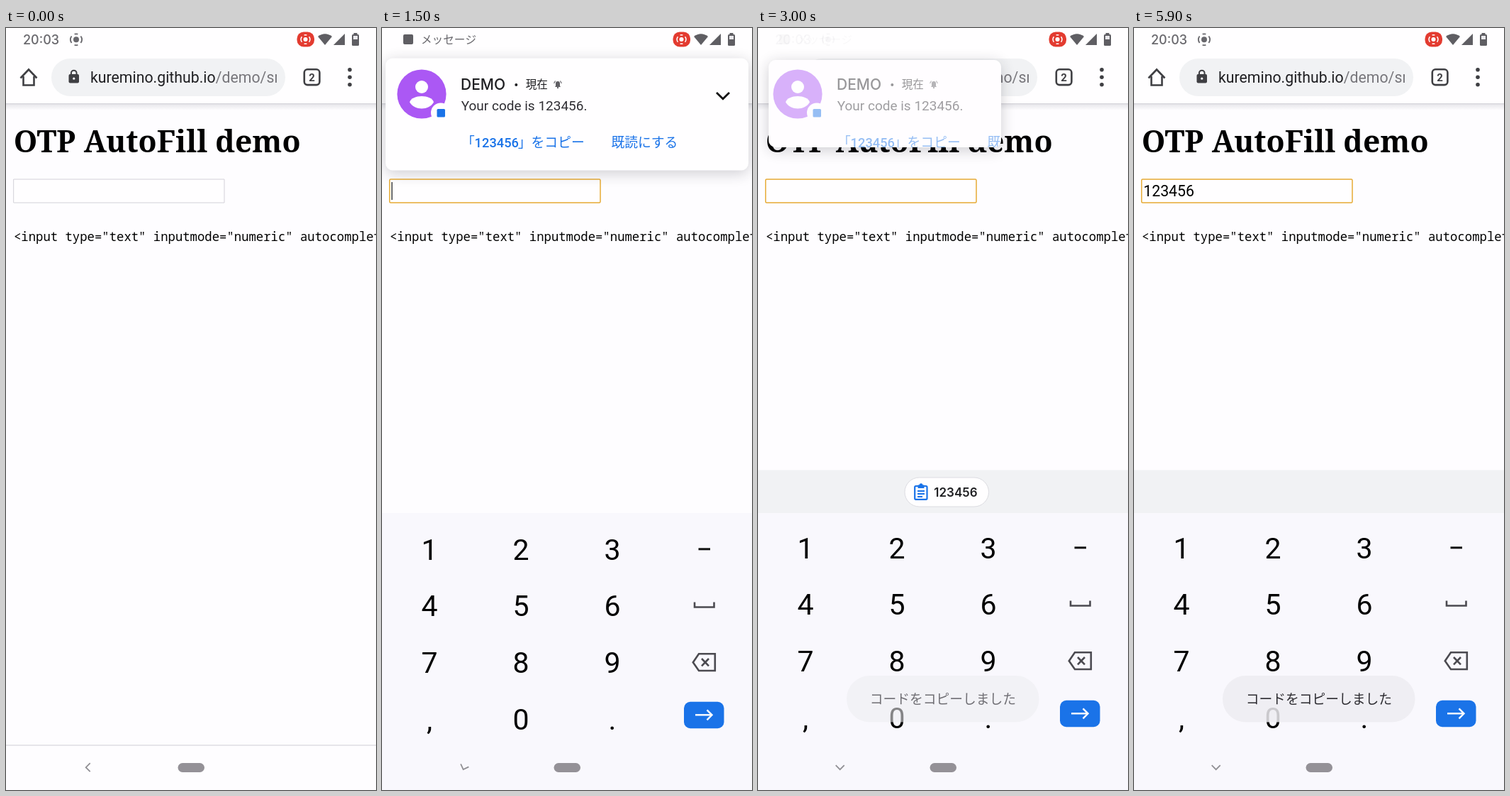
An HTML page with a canvas for the animation above (6 s loop, 522x1073 px).

```html
<!DOCTYPE html>
<html lang="ja">
<head>
<meta charset="utf-8">
<title>OTP AutoFill demo</title>
<style>
html, body { margin: 0; width: 100%; height: 100%; overflow: hidden; background: #fefdff; }
canvas { display: block; width: 522px; height: 1073px; }
</style>
</head>
<body>
<canvas id="stage" width="522" height="1073"></canvas>
<script>
const ctx = document.getElementById('stage').getContext('2d');
const W = 522, H = 1073, LOOP = 6000, STEP = 100;
const PAGE = '#fefdff', CARD = '#fffeff', INK = '#1f1f22', DARK = '#3f3f43';
const GRAY = '#5f5e63', BLUE = '#1a73e8', PILL = '#f1f2f4';
const ROBOTO = 'Roboto, sans-serif';
const INTER = 'Inter, sans-serif';
const CJK = '"Noto Sans CJK JP", "Noto Sans CJK", sans-serif';

// Linear interpolation through [time, value] pairs.
function key(t, ...pts) {
  if (t <= pts[0][0]) return pts[0][1];
  for (let i = 1; i < pts.length; i++) {
    const [t1, v1] = pts[i], [t0, v0] = pts[i - 1];
    if (t < t1) return v0 + (v1 - v0) * (t - t0) / (t1 - t0);
  }
  return pts[pts.length - 1][1];
}

function text(str, x, y, font, color, align = 'left') {
  ctx.font = font;
  ctx.fillStyle = color;
  ctx.textAlign = align;
  ctx.fillText(str, x, y);
}

function rect(x, y, w, h, color) {
  ctx.fillStyle = color;
  ctx.fillRect(x, y, w, h);
}

function roundPath(x, y, w, h, r) {
  ctx.beginPath();
  ctx.roundRect(x, y, w, h, r);
}

function round(x, y, w, h, r, color) {
  roundPath(x, y, w, h, r);
  ctx.fillStyle = color;
  ctx.fill();
}

function disc(x, y, r, color) {
  ctx.beginPath();
  ctx.arc(x, y, r, 0, Math.PI * 2);
  ctx.fillStyle = color;
  ctx.fill();
}

function stroke(color, width) {
  ctx.strokeStyle = color;
  ctx.lineWidth = width;
  ctx.stroke();
}

function poly(points, close) {
  ctx.beginPath();
  points.forEach(([x, y]) => ctx.lineTo(x, y));
  if (close) ctx.closePath();
}

function line(points, color, width, close) {
  poly(points, close);
  stroke(color, width);
}

function fill(points, color) {
  poly(points, true);
  ctx.fillStyle = color;
  ctx.fill();
}

function group(alpha, draw) {
  if (alpha <= 0) return;
  ctx.save();
  ctx.globalAlpha *= alpha;
  draw();
  ctx.restore();
}

function recordIcon(x, y, dot, ring, color, width) {
  disc(x, y, dot, color);
  for (let i = 0; i < 4; i++) {
    const mid = i * Math.PI / 2, half = i % 2 ? 0.3 : 0.64;
    ctx.beginPath();
    ctx.arc(x, y, ring, mid - half, mid + half);
    stroke(color, width);
  }
}

function statusBar(t) {
  const message = t < 2000
    ? key(t, [900, 0], [1000, 0.4], [1100, 1])
    : key(t, [2800, 1], [2900, 0.5], [3000, 0.04], [3100, 0]);
  const clock = t < 2000
    ? key(t, [900, 1], [1000, 0.3], [1100, 0])
    : key(t, [2900, 0], [3000, 0.05], [3100, 0.5], [3200, 0.9], [3300, 1]);
  group(clock, () => {
    text('20:03', 24, 23, '500 18px ' + INTER, '#68676c');
    recordIcon(99, 16.3, 4, 8, '#68676c', 1.8);
  });
  group(message, () => {
    round(30, 9, 14, 14, 2, GRAY);
    text('メッセージ', 55, 22, '15.6px ' + CJK, '#68676c');
  });

  round(410.5, 5.5, 24.5, 21, 9.5, '#e33b30');
  recordIcon(422.5, 16, 3, 6.3, '#fff', 1.5);
  ctx.beginPath();
  ctx.moveTo(450, 24);
  ctx.lineTo(440, 12);
  ctx.quadraticCurveTo(450, 4.5, 460, 12);
  ctx.closePath();
  ctx.fillStyle = GRAY;
  ctx.fill();
  fill([[478, 8], [478, 24], [462, 24]], GRAY);
  round(488, 9, 10, 16, 1.5, GRAY);
  rect(490.5, 7, 5, 3, GRAY);
  rect(490, 11, 6, 5, '#e9e8ec');
}

function toolbar() {
  rect(0, 0, W, 106, CARD);
  const shade = ctx.createLinearGradient(0, 106, 0, 116);
  shade.addColorStop(0, 'rgba(40,40,60,.20)');
  shade.addColorStop(0.25, 'rgba(40,40,60,.09)');
  shade.addColorStop(1, 'rgba(40,40,60,0)');
  rect(0, 106, W, 10, shade);

  line([[20.5, 70.5], [32, 58.5], [43.5, 70.5]], DARK, 2.6);
  line([[24.5, 68], [24.5, 80.5], [39.5, 80.5], [39.5, 68]], DARK, 2.6);

  round(64, 43, 330, 53, 26.5, PILL);
  round(88.5, 65, 14.5, 12.5, 2, DARK);
  ctx.beginPath();
  ctx.arc(95.75, 63.5, 3.8, Math.PI, 0);
  ctx.lineTo(99.55, 66);
  ctx.moveTo(91.95, 63.5);
  ctx.lineTo(91.95, 66);
  stroke(DARK, 2);
  disc(95.75, 71.2, 1.6, PILL);

  ctx.save();
  ctx.beginPath();
  ctx.rect(110, 43, 272, 53);
  ctx.clip();
  const host = 'kuremino.github.io', font = '21.3px ' + ROBOTO;
  text(host, 119, 77, font, INK);
  text('/demo/sms', 119 + ctx.measureText(host).width, 77, font, '#77767b');
  ctx.restore();

  roundPath(420.8, 58.3, 21.6, 21.8, 4.5);
  stroke(DARK, 2.6);
  text('2', 431.6, 74.7, '700 15px ' + ROBOTO, DARK, 'center');
  for (const y of [58.7, 69.2, 79.7]) disc(485, y, 2.8, DARK);
}

function page(t) {
  text('OTP AutoFill demo', 10.8, 174.6, '700 42.65px "Noto Serif", serif', '#000');
  const focused = t >= 1200, filled = t >= 4300;
  roundPath(10.7, 213, 297.3, 33, focused ? 1.5 : 0);
  ctx.fillStyle = CARD;
  ctx.fill();
  if (focused) stroke('#e6ab35', 1.5);
  else stroke('#d2d1d8', 1);
  if (filled) text('123456', 13.2, 237, '21.3px ' + ROBOTO, '#000');
  const since = filled ? 4400 : 1300;
  const caret = t < since || Math.floor((t - since) / 500) % 2 === 0;
  if (focused && caret) rect(filled ? 84.4 : 13.4, 217, 1.3, 25, '#222');
  text('<input type="text" inputmode="numeric" autocomplete="one-time-code">',
    11, 300, '17.27px "Noto Sans Mono", monospace', '#000');
}

function chip(t) {
  const scale = key(t, [2700, 0], [2800, 0.37], [2900, 0.85], [3000, 1]);
  const alpha = t < 4000 ? key(t, [2700, 0], [2800, 0.5], [2900, 0.9], [3000, 1])
    : key(t, [4200, 1], [4300, 0.5], [4400, 0]);
  group(alpha, () => {
    ctx.translate(266, 653.5);
    ctx.scale(scale, scale);
    ctx.translate(-266, -653.5);
    round(207, 633, 118.5, 41, 20.5, CARD);
    stroke('#dcdce1', 1);
    roundPath(221.2, 645, 17.3, 18.8, 1.5);
    stroke(BLUE, 2.2);
    rect(225.5, 643.5, 9, 4.5, BLUE);
    disc(230, 643.8, 2.5, BLUE);
    rect(225, 651, 10, 2, BLUE);
    rect(225, 655, 10, 2, BLUE);
    rect(225, 659, 7, 2, BLUE);
    text('123456', 248.3, 659.8, '600 17px ' + INTER, INK);
  });
}

function keyboard(t) {
  const rise = key(t, [1200, 330], [1300, 120], [1400, 18], [1500, 0]);
  const alpha = key(t, [1200, 0], [1300, 0.6], [1400, 1]);
  const bar = t >= 2700;
  group(alpha, () => {
    ctx.translate(0, rise);
    rect(0, 683, W, H - 683, '#f9f8fd');
    if (bar) {
      rect(0, 622.5, W, 60.5, PILL);
      chip(t);
    }
    ctx.translate(0, bar ? 0 : 2);
    ['123', '456', '789', ',0.'].forEach((row, r) => {
      [...row].forEach((label, c) =>
        text(label, 67 + c * 129, 746.5 + r * 79.7, '41px ' + ROBOTO, '#000', 'center'));
    });
    rect(446.5, 730.3, 16.5, 3, '#111');
    line([[441, 806.5], [441, 813.5], [468.5, 813.5], [468.5, 806.5]], '#4b4a50', 2.6);
    line([[447, 879.3], [469.8, 879.3], [469.8, 903], [447, 903], [438.8, 891.2]], '#4b4a50', 2.6, true);
    line([[451, 886], [461, 896.4]], '#4b4a50', 2.6);
    line([[461, 886], [451, 896.4]], '#4b4a50', 2.6);
    round(426, 946.8, 56.5, 37.4, 9, BLUE);
    line([[442, 965.3], [465, 965.3]], '#fff', 2.4);
    line([[458.5, 958.3], [465.5, 965.3], [458.5, 972.3]], '#fff', 2.4);
  });
}

function navBar(t) {
  const turn = key(t, [1200, 0], [1300, 15], [1400, 42], [1500, 70], [1600, 90]);
  ctx.save();
  ctx.translate(115.7, 1041.2);
  ctx.rotate(-turn * Math.PI / 180);
  line([[3, -6], [-3, 0], [3, 6]], '#908f94', 1.8);
  ctx.restore();
  round(242.5, 1035, 37.5, 13, 6.5, '#949197');
}

function bell(x, y) {
  ctx.beginPath();
  ctx.moveTo(x - 4, y + 3.5);
  ctx.lineTo(x - 3, y + 2);
  ctx.lineTo(x - 3, y - 1);
  ctx.arc(x, y - 1.5, 3, Math.PI, 0);
  ctx.lineTo(x + 3, y + 2);
  ctx.lineTo(x + 4, y + 3.5);
  ctx.closePath();
  ctx.fillStyle = GRAY;
  ctx.fill();
  disc(x, y + 4.6, 1.2, GRAY);
  for (const s of [-1, 1]) line([[x + s * 3.5, y - 5], [x + s * 5.4, y - 1.5]], GRAY, 1.1);
}

function ripple(t) {
  if (t < 2600) return;
  group(key(t, [2800, 1], [3000, 0]), () => {
    roundPath(113, 136.5, 184.5, 48.5, 5);
    ctx.clip();
    disc(219, 160.5, key(t, [2600, 40], [2700, 76], [2800, 106], [2900, 150]), '#e5e4e7');
  });
}

function cardContent(t) {
  disc(56, 93, 34.6, '#ab58f4');
  disc(56, 83, 9, '#fff');
  ctx.beginPath();
  ctx.moveTo(39, 104.5);
  ctx.bezierCurveTo(42, 93, 70, 93, 73, 104.5);
  ctx.bezierCurveTo(66, 116.5, 46, 116.5, 39, 104.5);
  ctx.fill();
  disc(83, 119.5, 14, CARD);
  round(77.5, 114, 11.5, 11.5, 1.5, BLUE);

  text('DEMO', 111, 86.7, '500 21px ' + INTER, INK);
  disc(189.3, 80, 2, INK);
  text('現在', 202.7, 85, '15.6px ' + CJK, INK);
  bell(248, 79.5);
  text('Your code is 123456.', 111.7, 115.5, '19px ' + ROBOTO, '#2f2e33');
  line([[472, 91], [481, 99.8], [490, 91]], '#111', 2.8);

  ripple(t);
  const jp = '18.8px ' + CJK;
  text('「', 112, 167.7, jp, BLUE);
  text('123456', 130.6, 167.6, '500 18.3px ' + ROBOTO, BLUE);
  text('」をコピー', 191.8, 167.7, jp, BLUE);
  text('既読にする', 323.5, 167.7, jp, BLUE);
}

function notification(t) {
  if (t < 1000 || t >= 3200) return;
  const drop = key(t, [1000, -120], [1100, -28], [1200, 5.3], [1300, 2.5], [1400, 0]);
  const edge = (a, b, c, d) => key(t, [2800, a], [2900, b], [3000, c], [3100, d]);
  const x = edge(5, 9, 15, 22), right = edge(517, 450, 343, 170);
  const y = edge(42.5, 43.5, 45, 46), bottom = edge(200.5, 189, 168, 125);
  ctx.save();
  ctx.translate(0, drop);
  ctx.save();
  ctx.shadowColor = 'rgba(30,30,45,.22)';
  ctx.shadowBlur = 20;
  ctx.shadowOffsetY = 4;
  round(x, y, right - x, bottom - y, 10, CARD);
  ctx.restore();
  roundPath(x, y, right - x, bottom - y, 10);
  ctx.clip();
  cardContent(t);
  // A veil in the card colour fades the content as one layer.
  group(edge(0, 0.2, 0.54, 0.85), () => rect(0, 0, W, 210, CARD));
  ctx.restore();
}

function toast(t) {
  const alpha = key(t, [2700, 0], [2800, 0.07], [2900, 0.35], [3000, 0.66], [3100, 0.88], [3200, 0.97], [3300, 1]);
  group(alpha, () => {
    group(0.85, () => round(125, 912, 271.5, 65.5, 32.5, '#eeedf1'));
    text('コードをコピーしました', 157.7, 952, '18.75px ' + CJK, '#2c2b30');
  });
}

function draw(t) {
  rect(0, 0, W, H, PAGE);
  page(t);
  toolbar();
  rect(0, 1009.3, W, 1.4, '#dddce2');
  keyboard(t);
  navBar(t);
  notification(t);
  statusBar(t);
  toast(t);
}

const start = performance.now();
function tick() {
  const t = (performance.now() - start) % LOOP;
  draw(Math.floor(t / STEP) * STEP);
  requestAnimationFrame(tick);
}
tick();
</script>
</body>
</html>
```
